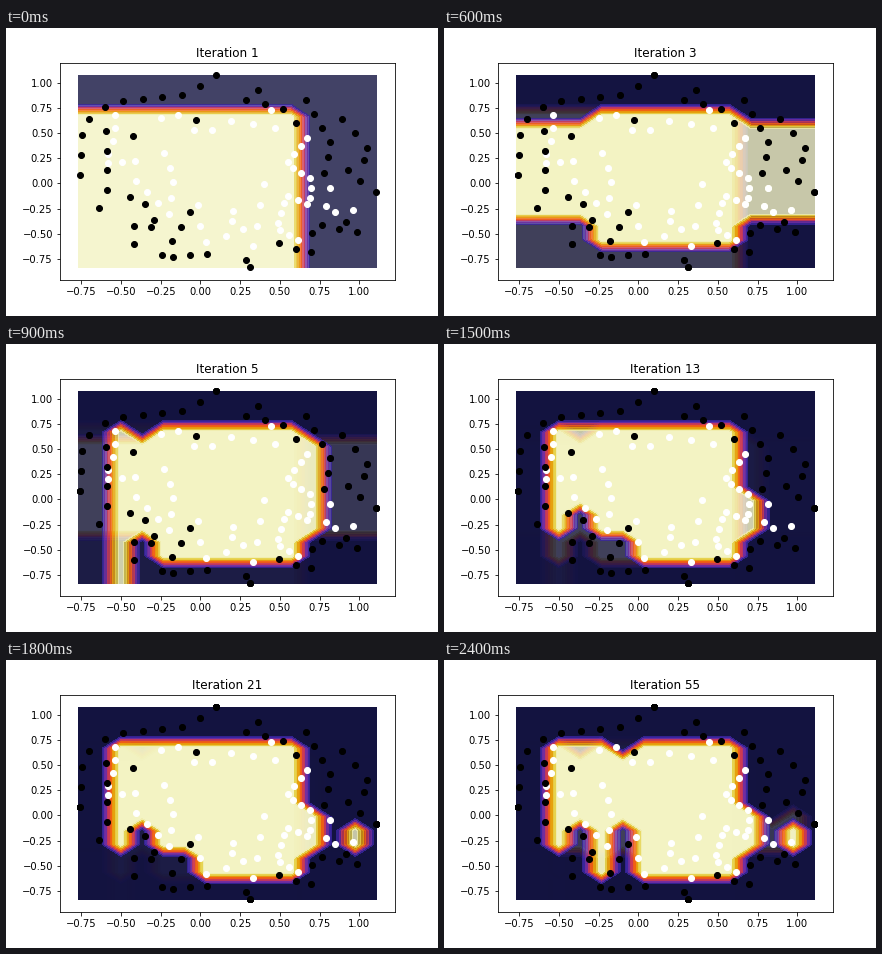
A matplotlib script for the animation above (2.7 s loop, 432x288 px).

```python
import matplotlib.pyplot as plt
import numpy as np
from matplotlib.animation import FuncAnimation

W, H, DPI = 432, 288, 72
LEFT, BOTTOM, RIGHT, TOP = 0.125, 0.125, 0.9, 0.88
X_RANGE, Y_RANGE = (-0.76974, 1.1089), (-0.83007, 1.0709)
GRID = 15
MARKER_RADIUS, MARGIN = 3, 0.05


def box(top, bottom, left, right):
    """Grid rows counted from the top, columns from the left, ends included."""
    return slice(top, bottom + 1), slice(left, right + 1)


# Building blocks of the positive region.
SLAB = box(3, 14, 0, 10)
BAND = box(4, 10, 0, 14)
MIDDLE = box(3, 12, 4, 10)
TRUNK = box(4, 10, 2, 10)
SIDE = box(4, 10, 11, 11)
STRIP, SHORT_STRIP, EDGE = (box(3, end, 2, 2) for end in (14, 12, 10))
UPPER, CREST, SHOULDER = box(3, 8, 2, 10), box(4, 8, 2, 10), box(3, 8, 2, 4)
HIP, HEART = box(3, 10, 4, 5), box(3, 12, 6, 10)
LOBE = box(3, 12, 4, 4)
BUMP = box(8, 10, 11, 11)
ISLAND, KNOB, ARM = box(9, 10, 13, 13), box(8, 10, 13, 13), box(9, 10, 11, 13)

STAGES = {
    1: [SLAB],
    2: [SLAB],
    3: [BAND, MIDDLE],
    5: [TRUNK, SIDE, MIDDLE, STRIP],
    8: [TRUNK, MIDDLE, SHORT_STRIP],
    13: [UPPER, EDGE, HIP, HEART, BUMP],
    21: [UPPER, EDGE, HIP, HEART, BUMP, ISLAND],
    34: [TRUNK, EDGE, LOBE, HEART, BUMP, ARM, KNOB],
    55: [CREST, SHOULDER, EDGE, LOBE, HEART, BUMP, ISLAND],
}

# Samples lie along strokes: dot count and the stroke's corners in pixels.
NEGATIVE_STROKES = [
    (11, [(74, 147), (76, 96), (106, 74), (182, 66), (210, 47)]),
    (5, [(252, 62), (238, 72), (274, 78), (290, 95)]),
    (6, [(300, 72), (325, 115), (318, 145)]),
    (7, [(336, 91), (367, 126), (340, 143), (370, 164)]),
    (8, [(340, 194), (353, 204), (307, 196), (305, 226), (273, 215)]),
    (5, [(100, 103), (102, 160), (93, 180)]),
    (6, [(124, 169), (136, 171), (153, 200), (128, 197), (128, 216)]),
    (7, [(201, 226), (154, 230), (173, 202), (184, 184)]),
    (2, [(240, 232), (244, 239)]),
    (2, [(127, 108), (190, 92)]),
]
POSITIVE_STROKES = [
    (7, [(109, 87), (109, 108), (99, 135), (129, 133)]),
    (8, [(155, 90), (165, 81), (196, 109), (220, 92), (272, 100), (265, 82)]),
    (18, [(301, 110), (280, 136), (305, 150), (304, 177), (281, 167),
          (270, 200), (292, 212)]),
    (4, [(324, 160), (319, 185), (347, 182)]),
    (8, [(158, 125), (168, 150), (163, 186), (130, 153)]),
    (11, [(192, 177), (196, 215), (228, 206), (224, 178), (247, 219),
          (258, 156)]),
]


def view_limits(low, high, pixels):
    """Limits that fit the whole markers plus the usual margin."""
    unit = (1 + 2 * MARGIN) * MARKER_RADIUS / pixels
    pad = unit * (high - low) / (1 - 2 * unit)
    margin = MARGIN * (high - low + 2 * pad)
    return low - pad - margin, high + pad + margin


def along(count, corners):
    """Evenly spaced points on a polyline."""
    corners = np.array(corners, dtype=float)
    steps = np.hypot(*np.diff(corners, axis=0).T)
    length = np.concatenate([[0], np.cumsum(steps)])
    at = np.linspace(0, length[-1], count)
    return np.column_stack([np.interp(at, length, c) for c in corners.T])


x_lim = view_limits(*X_RANGE, (RIGHT - LEFT) * W)
y_lim = view_limits(*Y_RANGE, (TOP - BOTTOM) * H)


def samples(strokes):
    px, py = np.vstack([along(*stroke) for stroke in strokes]).T
    return (np.interp(px, [LEFT * W, RIGHT * W], x_lim),
            np.interp(H - py, [BOTTOM * H, TOP * H], y_lim))


def prediction(boxes):
    z = -np.ones((GRID, GRID))
    for part in boxes:
        z[part] = 1
    return z


fig = plt.figure(figsize=(W / DPI, H / DPI), dpi=DPI, facecolor="white")
ax = fig.add_axes([LEFT, BOTTOM, RIGHT - LEFT, TOP - BOTTOM])
grid_x = np.linspace(*X_RANGE, GRID)
grid_y = np.linspace(*Y_RANGE, GRID)[::-1]
levels = np.linspace(-1, 1, 9)
ticks = np.arange(-0.75, 1.01, 0.25)
iterations = list(STAGES)
negative, positive = samples(NEGATIVE_STROKES), samples(POSITIVE_STROKES)


def draw(i):
    ax.clear()
    # Translucent layers pile up, so earlier stages shine through.
    for iteration in iterations[:i + 1]:
        ax.contourf(grid_x, grid_y, prediction(STAGES[iteration]), levels,
                    cmap="CMRmap", alpha=0.8)
        ax.scatter(*positive, c="white")
        ax.scatter(*negative, c="black")
    ax.set_title(f"Iteration {iterations[i]}")
    ax.set(xticks=ticks, yticks=ticks, xlim=x_lim, ylim=y_lim)
    return []


anim = FuncAnimation(fig, draw, frames=len(iterations), interval=300,
                     init_func=lambda: [], repeat=True, repeat_delay=0)
plt.show()
```
